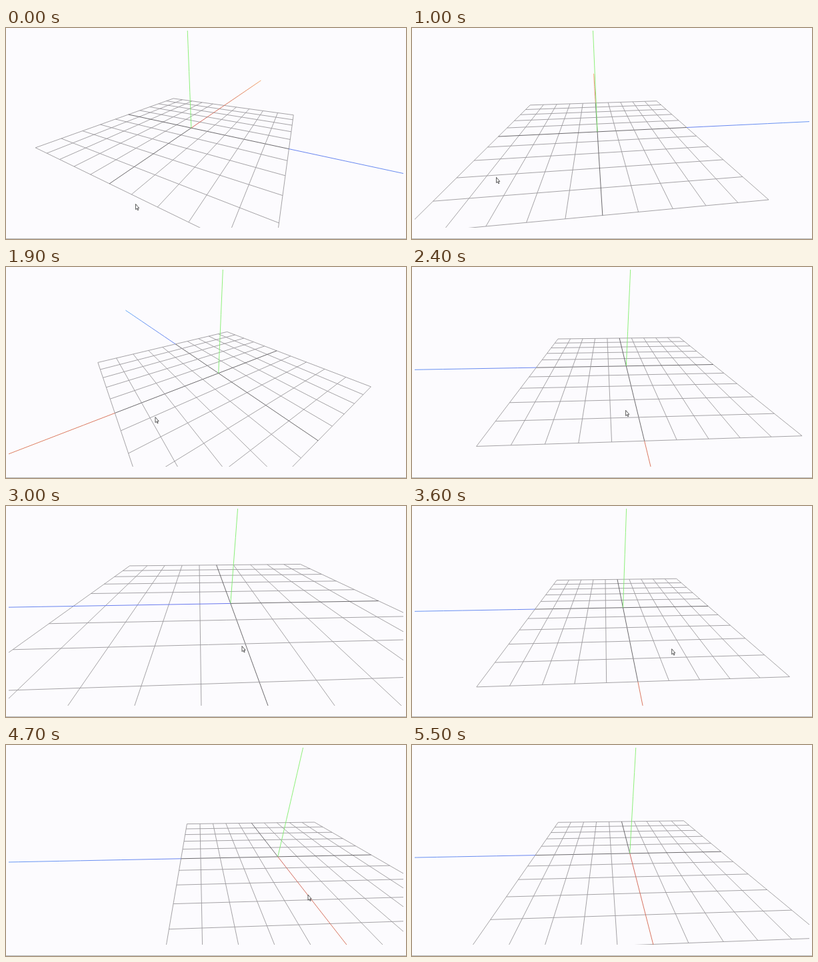
These frames come from a looping animation (600x317 px, 6 s). An HTML page with a canvas:

```html
<!DOCTYPE html>
<html lang="en">
<head>
<meta charset="utf-8">
<title>Orbiting grid</title>
<style>
html, body { margin: 0; width: 100%; height: 100%; overflow: hidden; background: #fcfbfe; }
canvas { display: block; }
</style>
</head>
<body>
<canvas id="stage" width="600" height="317"></canvas>
<script>
const ctx = document.getElementById('stage').getContext('2d');
const RAD = Math.PI / 180;
const FOCAL = 148 / Math.tan(30 * RAD); // 60 degree field of view
const TARGET = [0.0455, 0, 0.162];      // orbit centre; the grid spans -1 to 1
const AXIS = 4;

const AXES = {
  x: { dir: [1, 0, 0], from: [205, 90, 78], to: [245, 155, 85] },
  y: { dir: [0, 1, 0], from: [122, 238, 105], to: [175, 245, 120] },
  z: { dir: [0, 0, 1], from: [88, 103, 235], to: [85, 162, 245] }
};

const mix = (a, b, k) => a.map((v, i) => v + (b[i] - v) * k);

// Each gesture runs from 0 to 1; camera and pointer add up their shares.
function stateAt(t) {
  const ramp = (from, to) => Math.min(1, Math.max(0, (t - from) / (to - from)));
  const approach = ramp(0, 700), turn = ramp(750, 2330), rest = ramp(2220, 2520);
  const zoomIn = ramp(2450, 2950), zoomOut = ramp(3050, 3550), aim = ramp(3050, 3550);
  const pull = ramp(3550, 4100), sweep = ramp(4250, 4700);
  const back = ramp(4850, 5250), leave = ramp(5250, 5500);
  const arc = k => Math.sin(Math.PI * k);

  return {
    yaw: 27.1 - 209.27 * turn,
    pitch: 24.17 + 3.83 * turn + 3.7 * arc(turn),
    dist: 1.88 * 0.95 ** (11 * zoomIn - 12 * zoomOut), // 5% per wheel step
    panX: -0.366 * pull + 0.951 * sweep - 0.554 * back,
    panZ: 0.695 * pull - 0.41 * sweep - 0.068 * back,
    px: 194.5 - 95 * approach + 171 * turn + 83.5 * rest + 40 * aim
      - 47.5 * pull + 106.5 * sweep - 72 * back + 20 * leave,
    py: 264.5 - 42 * approach - 60 * arc(approach) + 4 * arc(turn) - 12 * rest - 3.5 * aim
      + 85 * pull - 67 * sweep - 7 * back + 110 * leave,
    // Inside the grid the flat axes share its depth and only sometimes win.
    redInside: turn === 0 || sweep > 0,
    blueInside: zoomIn > 0 && zoomOut < 1
  };
}

// Returns a function from world to [screen x, screen y, depth].
function makeCamera({ yaw, pitch, dist, panX, panZ }) {
  const s = Math.sin(yaw * RAD), c = Math.cos(yaw * RAD);
  const sp = Math.sin(pitch * RAD), cp = Math.cos(pitch * RAD);
  return point => {
    const [x, y, z] = point.map((v, i) => v - TARGET[i]);
    const ahead = x * c - z * s - panZ;
    const depth = dist + ahead * cp - y * sp;
    const k = FOCAL / depth;
    return [300 + (x * s + z * c + panX) * k, 152 - (ahead * sp + y * cp) * k, depth];
  };
}

function line(project, a, b, color) {
  const p = project(a), q = project(b);
  if (p[2] < 0.05 || q[2] < 0.05) return;
  ctx.strokeStyle = color;
  ctx.beginPath();
  ctx.moveTo(p[0], p[1]);
  ctx.lineTo(q[0], q[1]);
  ctx.stroke();
}

function drawGrid(project, { redInside, blueInside }) {
  for (let i = -5; i <= 5; i++) {
    const v = i / 5, color = i ? '#9b999c' : '#5c5a5d';
    line(project, [v, 0, -1], [v, 0, !i && blueInside ? 0 : 1], color);
    line(project, [-1, 0, v], [!i && redInside ? 0 : 1, 0, v], color);
  }
}

function drawAxis(project, { dir, from, to }, inside) {
  const step = 0.2;
  for (let s = inside ? 0 : 1; s < AXIS - 0.01; s += step) {
    const color = mix(from, to, s / AXIS).map(Math.round);
    line(project, dir.map(v => v * s), dir.map(v => v * (s + step)), `rgb(${color})`);
  }
}

const pointer = new Path2D('M0 0V8.2L1.8 6.6L3.1 9.4L4.2 8.9L3 6.1H5.2Z');

function drawPointer({ px, py }) {
  ctx.save();
  ctx.translate(px, py);
  ctx.lineWidth = 0.8;
  ctx.strokeStyle = '#333';
  ctx.fillStyle = '#fff';
  ctx.fill(pointer);
  ctx.stroke(pointer);
  ctx.restore();
}

function draw(t) {
  const state = stateAt(t);
  const project = makeCamera(state);
  ctx.fillStyle = '#fcfbfe';
  ctx.fillRect(0, 0, 600, 317);
  ctx.fillStyle = '#b8b8ba';
  ctx.fillRect(0, 316, 600, 1);

  ctx.save();
  ctx.beginPath();
  ctx.rect(4, 4, 592, 296);
  ctx.clip();
  ctx.lineWidth = 0.9;
  drawGrid(project, state);
  drawAxis(project, AXES.x, state.redInside);
  drawAxis(project, AXES.y, true);
  drawAxis(project, AXES.z, state.blueInside);
  ctx.restore();

  drawPointer(state);
}

const start = performance.now();
function tick() {
  const t = (performance.now() - start) % 6000;
  draw(Math.min(5500, Math.floor(t / 100) * 100));
  requestAnimationFrame(tick);
}
tick();
</script>
</body>
</html>
```
